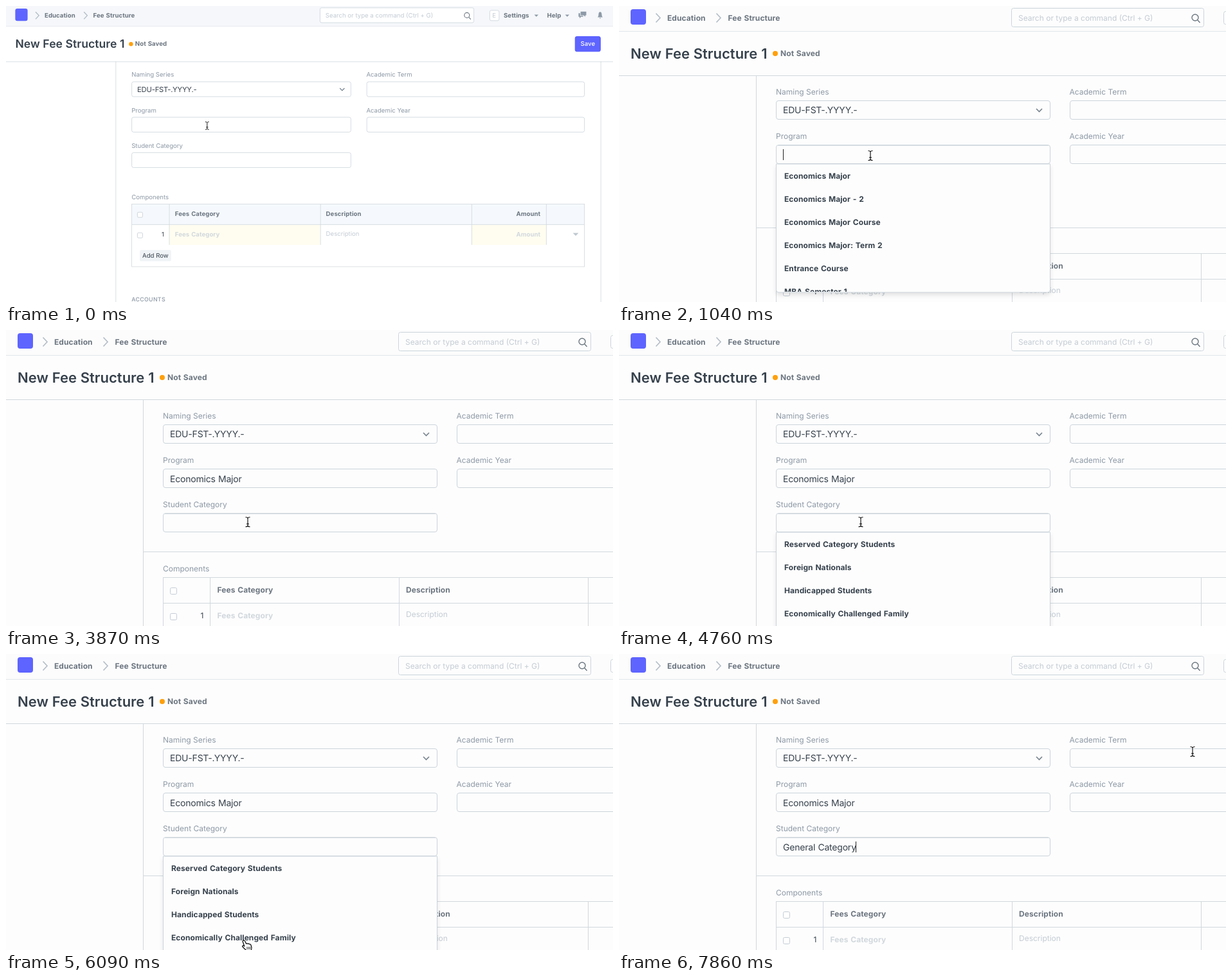
Write an HTML page that moves like this. It is 944x461 px and loops after 8000 ms.

```html
<!DOCTYPE html>
<html lang="en">
<head>
<meta charset="utf-8">
<title>Fee structure form</title>
<style>
  html, body { margin: 0; width: 100%; height: 100%; overflow: hidden; }
  svg {
    display: block; width: 944px; height: 461px;
    --page: #fdfdfd; --nav: #fcfcfc; --head: #fdfdfd; --required: #fdfdfd; --divider: #d1d8dd;
    background: var(--page);
    font-family: Inter, "Open Sans", sans-serif; font-size: 12px;
    text-rendering: geometricPrecision;
  }
  svg.far { --page: #fff; --nav: #f5f7fa; --head: #f5f9fd; --required: #fffdf0; --divider: none; }
  text { fill: #36414c; white-space: pre; }
  .bold, .crumb, .faint { font-weight: 700; letter-spacing: .08px; word-spacing: .8px; }
  .label { fill: #8d99a6; }
  .crumb { fill: #6c7680; }
  .title { font-size: 22px; font-weight: 600; word-spacing: .3px; }
  .value { font-size: 14px; letter-spacing: -.2px; word-spacing: .5px; }
  .hint { fill: #c4ccd4; }
  .faint { fill: #d1d8dd; }
  .section { fill: #8d99a6; font-size: 11px; font-weight: 500; letter-spacing: .4px; }
  .end { text-anchor: end; }
  .mid { text-anchor: middle; }
  .line { fill: none; stroke: #d1d8dd; }
  .field { fill: var(--page); stroke: #cbd4db; }
  .list { filter: drop-shadow(0 4px 3px rgba(0, 0, 0, .1)); }
</style>
</head>
<body>
<svg id="stage" viewBox="0 0 944 461"><g id="view"></g></svg>
<script>
const LOOP = 8000;
const stage = document.getElementById('stage');
const view = document.getElementById('view');

const text = (x, y, str, cls = '') => `<text x="${x}" y="${y}" class="${cls}">${str}</text>`;
const rect = (x, y, w, h, attrs = '') => `<rect x="${x}" y="${y}" width="${w}" height="${h}" ${attrs}/>`;
const path = (d, attrs = 'class="line"') => `<path d="${d}" ${attrs}/>`;
const fill = color => `style="fill:${color}"`;

const field = (x, y, label) =>
  text(x, y - 9, label, 'label') + rect(Math.ceil(x) + .5, y + .5, x < 700 ? 426 : 423, 29, 'rx="3.5" class="field"');
const crumbArrow = x => path(`M${x} 11.5l6.5 7-6.5 7`, 'fill="none" stroke="#b4bec8" stroke-width="1.7"');
const triangle = (x, y, w, color) => path(`M${x} ${y}h${w}l${-w / 2} ${w / 2}z`, fill(color));
const checkbox = y => rect(255.5, y + .5, 10, 10, 'rx="2" fill="#fff" stroke="#c3ccd4"');

const navbar = () =>
  rect(0, 0, 1180, 39, fill('var(--nav)')) + path('M0 39.5H1180', 'stroke="#e2e6ea"') +
  rect(18, 5, 24, 24, 'rx="4" fill="#5e64ff"') +
  crumbArrow(57.5) + text(75, 23, 'Education', 'crumb') +
  crumbArrow(151.5) + text(169.5, 23, 'Fee Structure', 'crumb') +
  rect(610.5, 3.5, 299, 29, 'rx="3" class="field"') +
  text(621, 23, 'Search or type a command (Ctrl + G)', 'hint') +
  path('M901 18a5 5 0 1 1-10 0a5 5 0 1 1 10 0M899.5 21.5l4 4.5', 'fill="none" stroke="#6c7680" stroke-width="1.4"') +
  rect(940.5, 8.5, 18, 20, 'rx="3" class="field"') + text(949, 22.5, 'E', 'hint mid') +
  text(967.5, 22.5, 'Settings', 'crumb') + triangle(1027, 17, 8, '#8d99a6') +
  text(1052, 22.5, 'Help', 'crumb') + triangle(1087, 17, 8, '#8d99a6') +
  path('M1117 11h11v7h-2v3l-3-3h-6zM1113 14h3v5h6v2h-4l-3 3v-3h-2z', fill('#8d99a6')) +
  path('M1150 22q2-2 2-6q0-4 3-4.500q3 .5 3 4.500q0 4 2 6zM1153.500 23h3l-1.500 2z', fill('#8d99a6'));

const pageHead = () =>
  path('M0 108.5H1180') +
  text(18, 81.5, 'New Fee Structure 1', 'title') +
  '<circle cx="243" cy="74" r="4" fill="#ffa00a"/>' +
  text(251, 78, 'Not Saved', 'crumb') +
  rect(1106.5, 59.5, 49, 29, 'rx="3" fill="#5e64ff" stroke="#444bff"') +
  '<text x="1131" y="78" class="mid" style="fill:#fff;font-weight:500">Save</text>';

const form = () =>
  path('M213.5 108V580M1156.5 108V580') +
  path('M213 345.5H1156', 'style="stroke:var(--divider)"') +
  field(244, 147, 'Naming Series') + text(255, 167, 'EDU-FST-.YYYY.-', 'value') +
  path('M649 160l4.500 4.500 4.500-4.500', 'fill="none" stroke="#76828e" stroke-width="1.6"') +
  field(700.5, 147, 'Academic Term') + field(244, 216, 'Program') +
  field(700.5, 216, 'Academic Year') + field(244, 285, 'Student Category');

const table = () =>
  text(244, 376, 'Components', 'label') +
  rect(245, 386, 879, 40, fill('var(--head)')) +
  rect(317, 426, 294, 39, fill('var(--required)')) + rect(905, 426, 145, 39, fill('var(--required)')) +
  rect(244.5, 385.5, 880, 122, 'class="line"') +
  path('M245 425.5H1124', 'stroke="#d1d8dd"') +
  [317.5, 611.5, 905.5, 1050.5].map(x => path(`M${x} 386V465`)).join('') +
  checkbox(401) + checkbox(441) +
  text(328.5, 409, 'Fees Category', 'crumb') + text(622, 409, 'Description', 'crumb') +
  text(1039, 409, 'Amount', 'crumb end') +
  text(307.5, 449, '1', 'end') + text(328.5, 449, 'Fees Category', 'faint') +
  text(622, 447, 'Description', 'hint') + text(1039, 449, 'Amount', 'faint end') +
  triangle(1102, 442, 11, '#c0c8d0') +
  rect(260, 475, 61, 22, 'rx="3" fill="#f0f4f7"') + text(290.5, 490.5, 'Add Row', 'mid') +
  text(244, 575.5, 'ACCOUNTS', 'section');

const dropdown = (id, top, items) =>
  `<clipPath id="${id}Clip">${rect(245, top, 426, 199)}</clipPath><g id="${id}">` +
  path(`M244.500 ${top}V${top + 196}q0 4 4 4H666.500q4 0 4-4V${top}z`,
    'class="list" fill="#fdfdfd" stroke="#cbd4db"') +
  `<g clip-path="url(#${id}Clip)">` +
  items.map((item, i) => text(257, top + 23 + i * 36, item, 'bold')).join('') + '</g></g>';

const beam = 'M-3.500-7.500q3 0 3.500 1.500q.5-1.500 3.500-1.500M0-6.500V6.500M-3.500 7.500q3 0 3.500-1.500q.5 1.500 3.500 1.500M-2 3h4';
const cursors =
  `<g id="beam" fill="none">${path(beam, 'stroke="#fff" stroke-width="2.6"')}${path(beam, 'stroke="#000" stroke-width="1.1"')}</g>` +
  `<g id="arrow">${path('M.5 0V13.500l3.200-3 2.200 5 2.200-1-2.200-4.800h4.300z', 'fill="#000" stroke="#fff"')}</g>` +
  `<g id="hand">${path('M-1 .2Q.6-.7 1.500 1L3.600 5.200Q5 4.300 6 5.400Q7.600 4.800 8.500 6Q10.500 5.600 11 7.500L12 11.500L11.200 16H4.200L.4 12.500L-2.400 9.600Q-2.200 7.800-.4 8.300L.8 9.200L-1.800 2Q-2 .7-1 .2z',
    'fill="#fff" stroke="#000" stroke-width="1.2" stroke-linejoin="round"')}` +
  `${path('M5 10v4M7.300 10v4M9.500 10v4', 'stroke="#000" stroke-width=".8"')}</g>`;

view.innerHTML = navbar() + pageHead() + form() + table() +
  text(255, 237, 'Economics Major', 'value" id="programValue') +
  text(255, 306, 'General Category', 'value" id="categoryValue') +
  path('M247 1.500H668', 'id="focus" stroke="#dfe4e8"') +
  dropdown('programs', 246, ['Economics Major', 'Economics Major - 2', 'Economics Major Course',
    'Economics Major: Term 2', 'Entrance Course', 'MBA Semester 1']) +
  dropdown('categories', 315, ['Reserved Category Students', 'Foreign Nationals', 'Handicapped Students',
    'Economically Challenged Family', 'General Category']) +
  path('M0 0V17', 'id="caret" stroke="#222"') + cursors;

const el = id => document.getElementById(id);
const show = (id, on) => el(id).setAttribute('display', on ? 'inline' : 'none');
const move = (id, x, y) => el(id).setAttribute('transform', `translate(${x} ${y})`);
const within = (t, from, to) => t >= from && t < to;

// Pointer stops: time, x, y, shape
const stops = [
  [0, 391, 233, 'beam'], [1490, 389, 239, 'beam'], [1640, 386, 251, 'hand'], [1780, 383, 259, 'hand'],
  [1930, 381, 262, 'hand'], [2230, 381, 261, 'arrow'], [2680, 366, 345, 'arrow'], [2830, 343, 443, 'beam'],
  [3270, 374, 302, 'beam'], [3420, 376, 299, 'beam'], [5050, 379, 309, 'beam'], [5200, 392, 340, 'hand'],
  [5350, 411, 378, 'hand'], [5500, 416, 395, 'hand'], [5790, 371, 391, 'hand'], [5940, 371, 418, 'hand'],
  [6090, 370, 446, 'hand'], [6230, 369, 466, 'hand'], [6680, 366, 455, 'arrow'], [6830, 364, 438, 'beam'],
];

// Final sweep from the table to the Academic Term field
const smooth = p => p * p * (3 - 2 * p);
for (let i = 1; i <= 7; i++) {
  const p = smooth(i / 7);
  stops.push([6830 + i * 147 - i % 2, 364 + 528 * p, 438 - 286 * p, i > 5 ? 'beam' : 'arrow']);
}

// Caret visible: from, to, x, y
const carets = [
  [150, 450, 255.5, 223], [890, 1490, 255.5, 223], [1930, 2230, 255.5, 223], [2230, 2680, 365.5, 223],
  [3420, 3870, 255.5, 292], [4310, 4760, 255.5, 292], [5200, 5500, 255.5, 292],
  [6680, 7130, 368.5, 292], [7570, 8000, 368.5, 292],
];

// The list overshoots slightly when it opens
function drawList(id, t, open, close, top) {
  show(id, within(t, open, close));
  const s = t < open + 150 ? 1.01 : 1;
  el(id).setAttribute('transform', `translate(264 ${top}) scale(${s}) translate(-264 ${-top})`);
}

function draw(t) {
  const far = t < 150;
  stage.classList.toggle('far', far);
  view.setAttribute('transform', `scale(${far ? .8 : 1})`);

  show('programValue', t >= 2230);
  show('categoryValue', t >= 6680);
  show('focus', !far);
  move('focus', 0, t < 3420 ? 216 : 285);
  drawList('programs', t, 890, 2230, 246);
  drawList('categories', t, 4310, 6680, 315);

  const caret = carets.find(([from, to]) => within(t, from, to));
  show('caret', caret);
  if (caret) move('caret', caret[2], caret[3]);

  const [, x, y, shape] = stops.filter(stop => stop[0] <= t).pop();
  for (const id of ['beam', 'arrow', 'hand']) show(id, id === shape);
  move(shape, x, y);
}

function tick() {
  draw(performance.now() % LOOP);
  requestAnimationFrame(tick);
}
tick();
</script>
</body>
</html>
```
